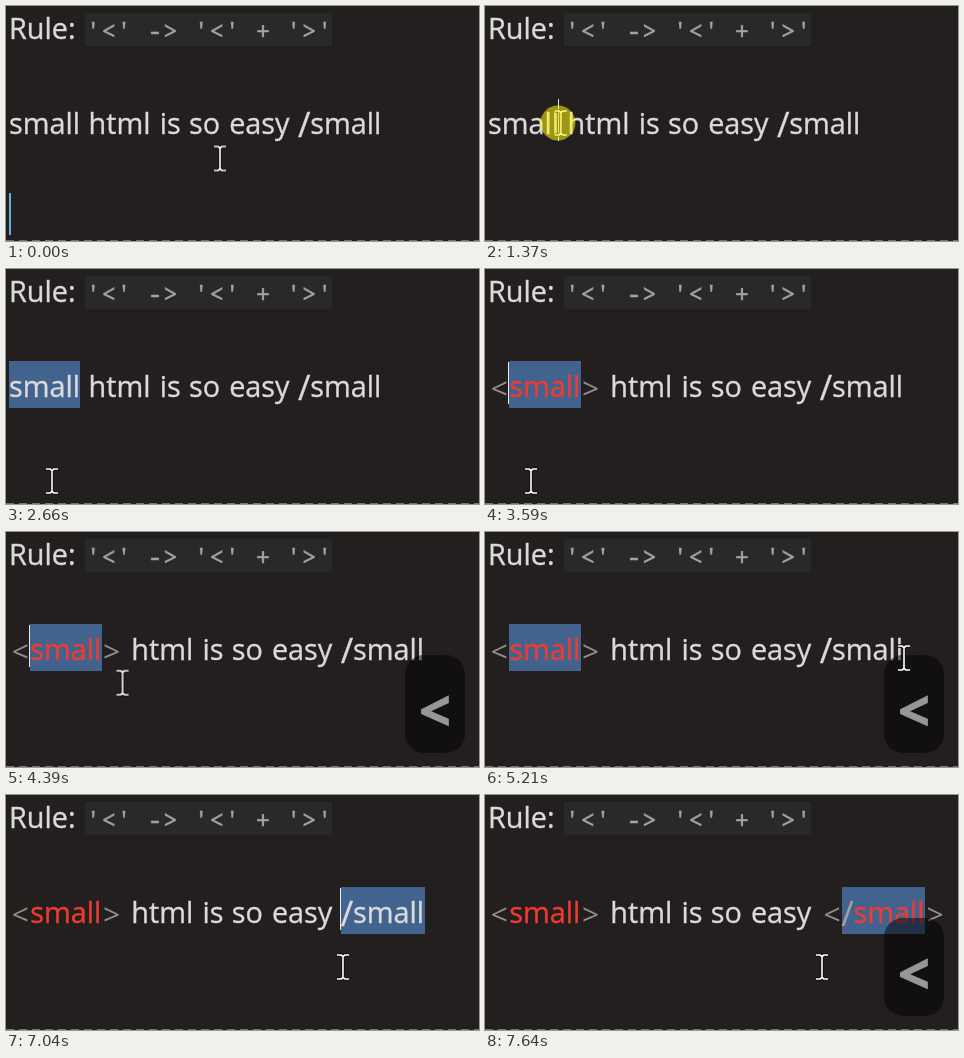
These frames come from a looping animation (473x235 px, 8000 ms). An HTML page:

```html
<!DOCTYPE html>
<html lang="en">
<head>
<meta charset="utf-8">
<title>Wrapping a selection in angle brackets</title>
<style>
html, body { margin: 0; width: 100%; height: 100%; overflow: hidden; background: #231f1f; }
svg { display: block; width: 473px; height: 235px; animation: select 8s step-end infinite; }
text { font: 28.8px "Open Sans", "Noto Sans", sans-serif; fill: #dcdad9; stroke: #dcdad9; stroke-width: .35px; white-space: pre; }
.code { font: 25.73px "Noto Sans Mono", "DejaVu Sans Mono", monospace; fill: #a3a3a3; stroke: #a3a3a3; }
.tag { fill: #f13b31; stroke: #f13b31; }
.mark { fill: #918f8e; stroke: none; font-size: 30px; text-anchor: middle; }
.slash { font-size: 34px; }
.closed .slash { fill: #a3a1a0; stroke: none; }

/* --head and --tail are the ends of the selection; the caret sits at the head */
.sel { x: calc(var(--head) * 1px); width: calc((var(--tail) - var(--head)) * 1px); fill: #43638f; }
.caret { x: calc(var(--head) * 1px - 1px); fill: #e8e8e8; animation: blink 8s step-end infinite; }
.idle { fill: #62b0da; animation: idle 8s step-end infinite; }

.plain { animation: plain 8s step-end infinite; }
.opened { animation: opened 8s step-end infinite; }
.unclosed { animation: unclosed 8s step-end infinite; }
.closed { animation: closed 8s step-end infinite; }
.shift { animation: shift 8s step-end infinite; }

.pointer { animation: move 8s linear infinite; }
.beam { fill: none; stroke: #fff; stroke-width: 3.6; stroke-linejoin: round; }
.press { fill: rgb(255, 246, 20); animation: press 8s step-end infinite; }
.key { animation: key 8s step-end infinite; }
.key text { font-weight: 700; font-size: 55px; fill: #979797; stroke: #979797; stroke-width: 1px; text-anchor: middle; }

@keyframes select {
  0% { --head: 3; --tail: 3; }
  15.375% { --head: 74; --tail: 74; }
  17.375% { --head: 66.5; --tail: 74; }
  17.9% { --head: 59; --tail: 74; }
  18.8% { --head: 43; --tail: 74; }
  20.5% { --head: 16; --tail: 74; }
  26.1% { --head: 3; --tail: 74; }
  44.875% { --head: 24; --tail: 96; }
  67.625% { --head: 419; --tail: 419; }
  68.6% { --head: 411; --tail: 419; }
  69.2% { --head: 403; --tail: 419; }
  70.1% { --head: 387; --tail: 419; }
  71.8% { --head: 360; --tail: 419; }
  73.4% { --head: 347; --tail: 419; }
  74.35% { --head: 335; --tail: 419; }
  93.125%, 100% { --head: 357; --tail: 440; }
}
@keyframes blink {
  0%, 33%, 47.5%, 61.5%, 81.375%, 94.75%, 100% { opacity: 0; }
  15.375%, 39.875%, 54.875%, 67.625%, 88% { opacity: 1; }
}
@keyframes idle {
  0%, 12.125% { opacity: 1; }
  5.5%, 15.375%, 100% { opacity: 0; }
}
@keyframes plain { 0% { opacity: 1; } 44.875%, 100% { opacity: 0; } }
@keyframes opened { 0% { opacity: 0; } 44.875%, 100% { opacity: 1; } }
@keyframes unclosed { 0% { opacity: 1; } 93.125%, 100% { opacity: 0; } }
@keyframes closed { 0% { opacity: 0; } 93.125%, 100% { opacity: 1; } }
@keyframes shift {
  0% { transform: none; }
  44.875%, 100% { transform: translateX(42.7px); }
}
@keyframes press {
  0%, 29.75%, 78.75%, 100% { opacity: 0; }
  15.375%, 67.625% { opacity: .56; }
}
@keyframes key {
  0% { opacity: 0; }
  45.75% { opacity: 1; }
  67.625% { opacity: 1; animation-timing-function: linear; }
  71.25% { opacity: 0; }
  93.875%, 100% { opacity: 1; }
}
@keyframes move {
  0% { transform: translate(214px, 152.5px); }
  .875% { transform: translate(214px, 152.5px); animation-timing-function: ease-in-out; }
  8.75%, 17.125% { transform: translate(76px, 117px); }
  21.375%, 22.25% { transform: translate(21px, 117px); }
  27.25% { transform: translate(10px, 124px); }
  29.625% { transform: translate(10px, 124px); animation-timing-function: ease-out; }
  33.25%, 54.75% { transform: translate(46px, 212px); }
  54.875% { transform: translate(116px, 151px); }
  58.75% { transform: translate(290px, 67px); animation-timing-function: ease-out; }
  64.25% { transform: translate(424px, 122px); }
  65.125%, 68.5% { transform: translate(419px, 126px); }
  74.5% { transform: translate(342px, 129px); }
  76.25% { transform: translate(338px, 129px); }
  78.625% { transform: translate(338px, 129px); animation-timing-function: ease-out; }
  83%, 100% { transform: translate(337px, 172px); }
}
</style>
</head>
<body>
<svg viewBox="0 0 473 235">
  <defs>
    <path id="beam" d="M-6-12h4l2 1.5 2-1.5h4M0-10.5v21M-6 12h4l2-1.5 2 1.5h4"/>
  </defs>
  <text x="3" y="33">Rule:</text>
  <rect x="79" y="7" width="247" height="33" fill="#292929"/>
  <text class="code" x="79.5" y="33.5">'&lt;' -&gt; '&lt;' + '&gt;'</text>

  <rect class="sel" y="92" height="47"/>
  <text class="plain" x="3" y="128">small</text>
  <g class="opened">
    <text class="mark" x="14.3" y="130">&lt;</text>
    <text class="tag" x="24.3" y="128">small</text>
    <text class="mark" x="105.7" y="130">&gt;</text>
  </g>
  <g class="shift">
    <text y="128"><tspan x="82.6">html</tspan> <tspan x="153.8">is</tspan> <tspan x="183.1">so</tspan> <tspan x="223.2">easy</tspan></text>
    <text class="unclosed"><tspan class="slash" x="292" y="131">/</tspan><tspan x="304.3" y="128">small</tspan></text>
  </g>
  <g class="closed">
    <text class="mark" x="347" y="130">&lt;</text>
    <text><tspan class="slash" x="356.3" y="131">/</tspan><tspan class="tag" x="368.4" y="128">small</tspan></text>
    <text class="mark" x="450" y="130">&gt;</text>
  </g>
  <rect class="caret" y="93" width="1" height="42"/>
  <rect class="idle" x="3" y="187" width="2" height="42"/>
  <path d="M0 234.5H473" stroke="#777271" stroke-dasharray="8 5"/>

  <g class="key">
    <rect x="399" y="123" width="60" height="98" rx="19" fill="#000" fill-opacity=".5"/>
    <text x="429" y="199">&lt;</text>
  </g>
  <g class="pointer">
    <g class="beam">
      <use href="#beam" stroke="#111"/>
      <use href="#beam" stroke-width="1.6"/>
    </g>
    <circle class="press" cx="-3" r="17.5"/>
  </g>
</svg>
</body>
</html>
```
